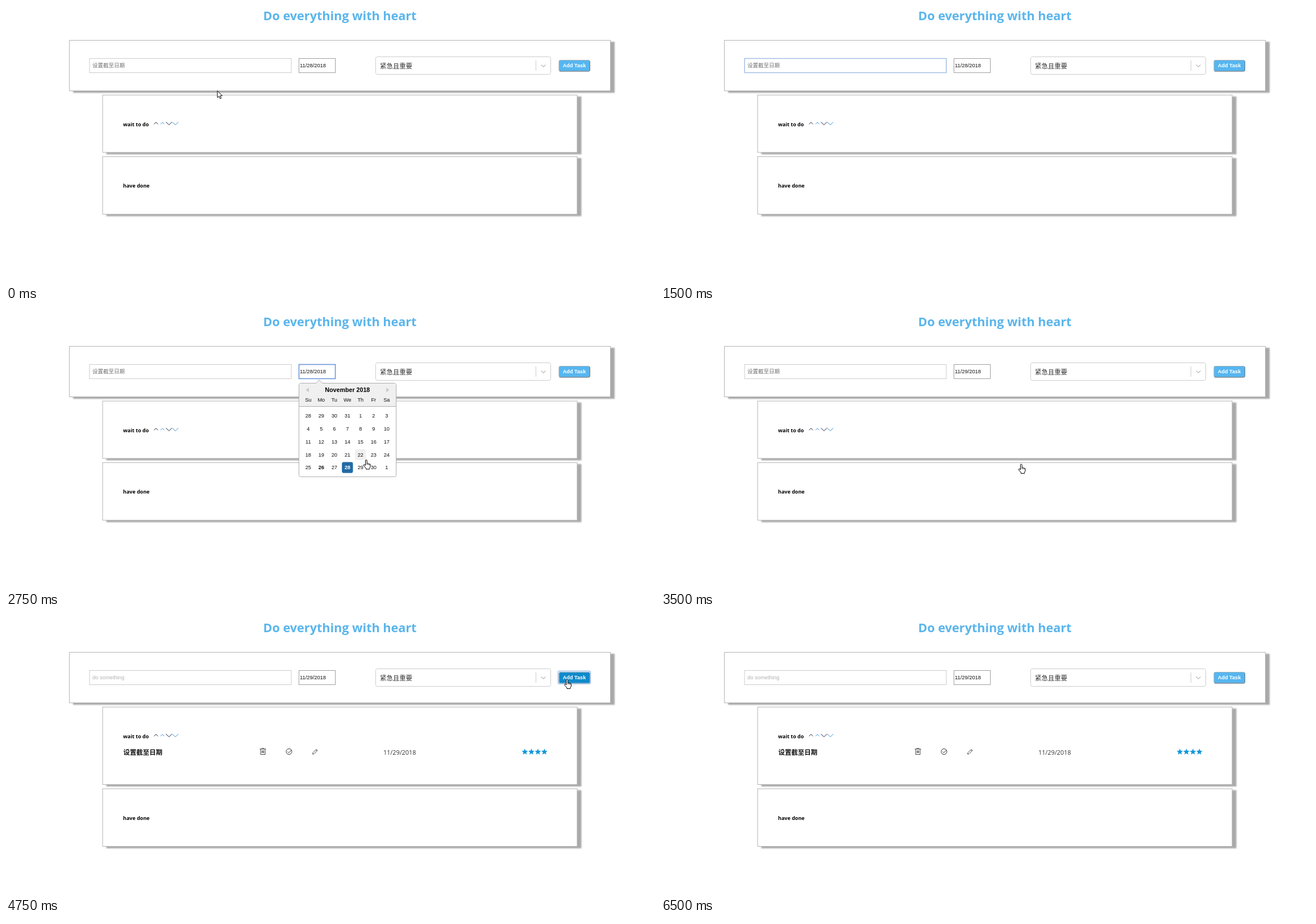
Write an HTML page that moves like this. It is 1142x490 px and loops after 6750 ms.

```html
<!DOCTYPE html>
<html lang="zh">
<head>
<meta charset="utf-8">
<title>Task list</title>
<style>
html, body { margin: 0; width: 100%; height: 100%; overflow: hidden; background: #fff; }
svg { display: block; }
text { white-space: pre; }
.ui { font-family: "Open Sans", sans-serif; }
.form { font-family: "Liberation Sans", Arial, sans-serif; }
.cjk { font-family: "Noto Sans CJK SC", "Noto Sans CJK", sans-serif; }
.card { fill: #fff; stroke: #b4b4b4; filter: drop-shadow(7px 3px 1px #a9a9a9); }
</style>
</head>
<body>
<svg id="stage" width="1142" height="490" viewBox="0 0 1142 490"></svg>
<script>
const STEP = 250, LOOP = 6750;
const stage = document.getElementById('stage');

// Pointer per step: [kind, x, y]; steps not listed show no pointer.
const pointers = {
  0: ['arrow', 372, 149.5], 1: ['arrow', 373.5, 122.5],
  9: ['arrow', 575, 166.5], 10: ['hand', 610.5, 224], 11: ['hand', 628.5, 260],
  12: ['hand', 628.5, 267.5], 13: ['hand', 628.5, 267.5], 14: ['hand', 628.5, 267.5],
  15: ['arrow', 703.5, 241], 16: ['arrow', 908, 149.5], 17: ['arrow', 967, 116.5],
  18: ['hand', 996.5, 100], 19: ['hand', 982, 107.5],
  20: ['arrow', 925.5, 144.5], 21: ['arrow', 783.5, 289.5],
  22: ['arrow', 690.5, 386.5], 23: ['arrow', 599.5, 462.5]
};
const pointerShapes = {
  arrow: 'M0 0V12L2.8 9.4 4.7 13.8 6.7 13 4.8 8.7H8.5Z',
  hand: 'M4 10.5V2a1.3 1.3 0 0 1 2.7 0V7q1.3-1 2.2.4 1.3-.7 2 .5 1.5-.4 1.6 1V12.5L11 15.5V17H5V15.5L1 10.8Q.3 9.6 1.3 9 2.4 8.6 4 10.5Z'
};

const rect = (x, y, w, h, fill, stroke = 'none', r = 0, width = 1) =>
  `<rect x="${x}" y="${y}" width="${w}" height="${h}" rx="${r}" fill="${fill}" stroke="${stroke}" stroke-width="${width}"/>`;
const text = (s, x, y, size, font, fill = '#000', weight = 400, anchor = 'start') =>
  `<text x="${x}" y="${y}" class="${font}" font-size="${size}" fill="${fill}" font-weight="${weight}" text-anchor="${anchor}">${s}</text>`;
const line = (d, stroke, width = 1) =>
  `<path d="${d}" fill="none" stroke="${stroke}" stroke-width="${width}"/>`;
const shape = (d, fill) => `<path d="${d}" fill="${fill}"/>`;
const card = (x, y, w, h) => `<rect class="card" x="${x}" y="${y}" width="${w}" height="${h}"/>`;

function star(cx, cy) {
  const points = Array.from({ length: 10 }, (_, i) => {
    const r = i % 2 ? 2.6 : 5.8, a = i * Math.PI / 5;
    return `${(cx + r * Math.sin(a)).toFixed(2)},${(cy - r * Math.cos(a)).toFixed(2)}`;
  });
  return `<polygon points="${points.join(' ')}" fill="#1296db"/>`;
}

function form(step, added) {
  const inputFocus = step >= 3 && step <= 6;
  const dateFocus = step >= 7 && step <= 12;
  const hover = step === 18 || step === 19;
  const buttonFocus = step >= 19 && step <= 25;
  return card(111.5, 60.5, 952, 89)
    + rect(147, 92.5, 355, 25, '#fff', inputFocus ? '#a3bfe4' : '#ccc', 0, inputFocus ? 1.5 : 1)
    + (added ? text('do something', 152, 108, 9.4, 'form', '#b0b0b0')
             : text('设置截至日期', 152, 108, 9.5, 'cjk', '#707070'))
    + rect(515.5, 92.5, 64, 25, '#fff', dateFocus ? '#6b98da' : '#a0a0a0', 0, dateFocus ? 1.6 : 1)
    + text(step >= 14 ? '11/29/2018' : '11/28/2018', 517, 108, 9.33, 'form', '#111')
    + rect(650.5, 89.5, 308, 31, '#fff', '#ccc', 3)
    + text('紧急且重要', 658, 110, 11.4, 'cjk', '#333')
    + line('M932.5 96V114', '#ccc')
    + line('M941.5 103.5L945.5 107.3 949.5 103.5', '#c4c4c4', 1.5)
    + (buttonFocus ? rect(971.5, 93.5, 57, 22.5, 'none', '#9dbde8', 2, 1.5) : '')
    + rect(973, 95.5, 54.5, 19.5, hover ? '#108acb' : '#56b6f0', hover ? '#a9b4bc' : '#a4b0b8', 2.5)
    + (hover ? '' : line('M974 115H1025.5Q1027.5 115 1027.5 113V97', '#6d7a84'))
    + text('Add Task', 1000, 108, 9.2, 'form', '#fff', 700, 'middle');
}

function task() {
  const ink = '#333';
  return text('设置截至日期', 206.5, 241, 11.45, 'cjk', '#111', 700)
    + line('M446.5 231H457.5M450 231V229.8H454V231M448 231V240.5H456V231M450.4 233.5V238M452 233.5V238M453.6 233.5V238', ink, .9)
    + `<circle cx="498" cy="235.5" r="5" fill="none" stroke="${ink}"/>`
    + line('M495.5 235.5L497.5 237.5 502.5 232.8', ink)
    + line('M539.5 240L540 237.5 545 232.5 547 234.5 542 239.5ZM545 232.5L546 231.5 548 233.2 547 234.5', ink, .9)
    + text('11/29/2018', 664, 241, 10.8, 'ui', '#333')
    + [913, 924.5, 936, 947.3].map(x => star(x, 236)).join('');
}

function lists(added) {
  const shift = added ? 35.5 : 0;
  return card(170, 157, 835, 101 + shift)
    + text('wait to do', 206, 211.5, 9.05, 'ui', '#000', 700)
    + line('M260.5 208.3L264 205 267.5 208.3', '#2c2c4c')
    + line('M272 208.3L275.3 205 278.5 208.3', '#3c94d4')
    + line('M281.5 204.5L286.8 209.5 292 204.5', '#25254a')
    + line('M292.5 204.5L298 209.5 303.2 204.5', '#3c94d4')
    + (added ? task() : '')
    + card(170, 265.5 + shift, 835, 101.5)
    + text('have done', 206, 320 + shift, 9, 'ui', '#000', 700);
}

function calendar(hoveredDay) {
  const column = i => 531.8 + 23 * i;
  let out = rect(515.5, 125.5, 171, 165, '#fff', '#aeaeae', 3)
    + shape('M516 166V128Q516 126 518 126H684Q686 126 686 128V166Z', '#f0f0f0')
    + line('M516 166.5H686', '#aeaeae')
    + shape('M545 126L551 119.8 557 126Z', '#f0f0f0')
    + line('M545 125.5L551 119.8 557 125.5', '#aeaeae')
    + shape('M533 133.3V141.7L527.5 137.5Z', '#ccc')
    + shape('M669 133.3V141.7L674.5 137.5Z', '#ccc')
    + text('November 2018', 600.8, 141.2, 10.7, 'form', '#000', 700, 'middle');
  ['Su', 'Mo', 'Tu', 'We', 'Th', 'Fr', 'Sa'].forEach((name, i) => {
    out += text(name, column(i), 158.3, 9.2, 'form', '#111', 400, 'middle');
  });
  for (let i = 0; i < 35; i++) {
    const day = i - 3, x = column(i % 7), y = 182.7 + 22.85 * Math.floor(i / 7);
    const label = day < 1 ? 31 + day : day > 30 ? day - 30 : day;
    const selected = day === 28;
    if (selected || day === hoveredDay)
      out += rect(x - 9.7, y - 9.6, 19.4, 19.2, selected ? '#216ba5' : '#f0f0f0', 'none', 3);
    out += text(label, x, y + 3.3, 9.2, 'form', selected ? '#fff' : '#111',
      selected || day === 26 ? 700 : 400, 'middle');
  }
  return out;
}

function pointer(step) {
  if (!pointers[step]) return '';
  const [kind, x, y] = pointers[step];
  return `<path transform="translate(${x} ${y})" d="${pointerShapes[kind]}" fill="#fff" stroke="#000" stroke-linejoin="round"/>`
    + (kind === 'hand' ? `<path transform="translate(${x} ${y})" d="M6.7 7V9.5M8.9 7.5V9.7M10.9 8V10" stroke="#000" stroke-width=".8"/>` : '');
}

function draw(step) {
  const added = step >= 19;
  const hoveredDay = step === 11 ? 22 : step >= 12 ? 29 : 0;
  stage.innerHTML = text('Do everything with heart', 587.5, 25, 21.6, 'ui', '#5ab5ec', 700, 'middle')
    + form(step, added)
    + lists(added)
    + (step >= 7 && step <= 13 ? calendar(hoveredDay) : '')
    + pointer(step);
}

let shown = -1;
function tick() {
  const step = Math.floor(performance.now() % LOOP / STEP);
  if (step !== shown) draw(shown = step);
  requestAnimationFrame(tick);
}
tick();
</script>
</body>
</html>
```
